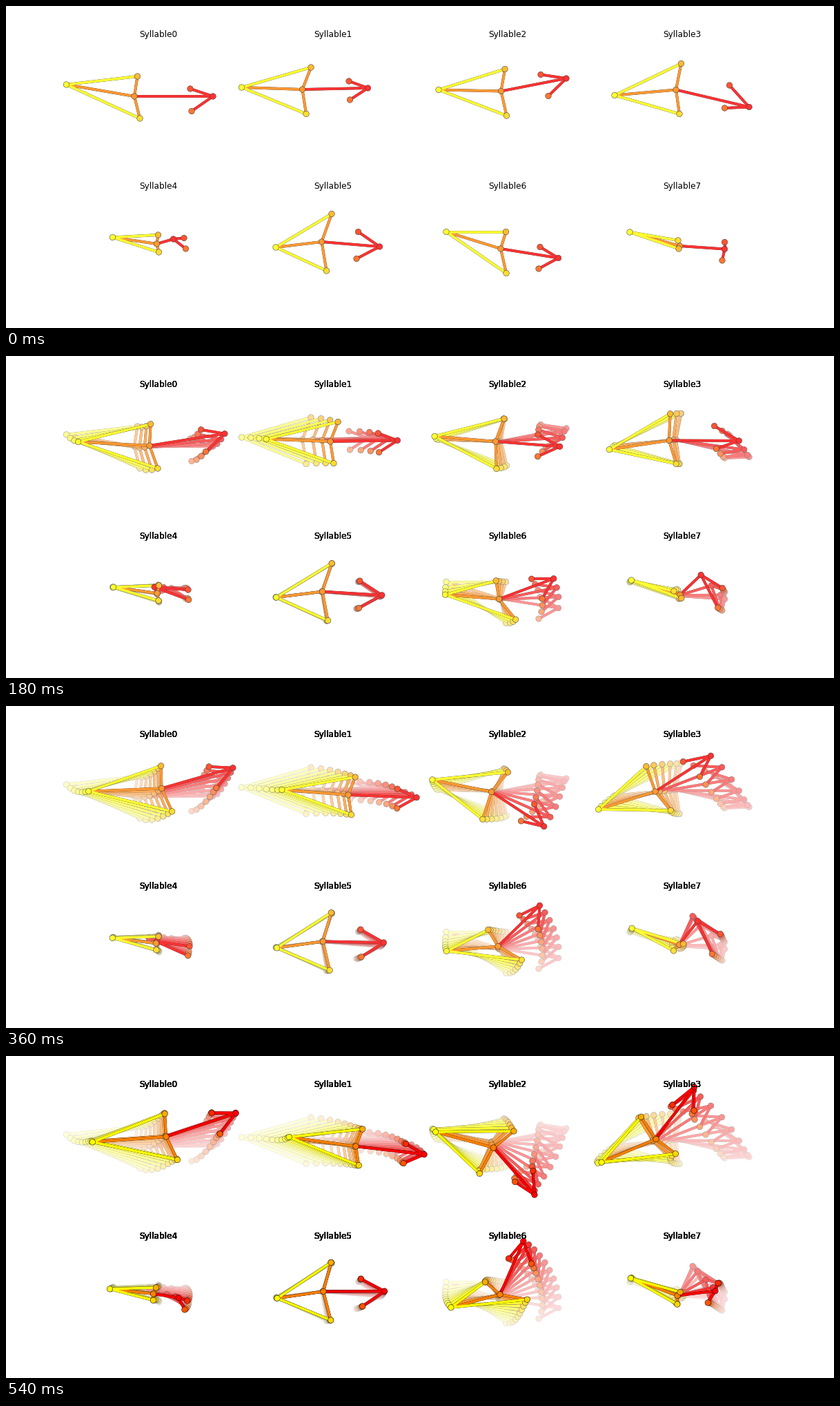
Recreate the animation shown at these times as a matplotlib script. Size 1200 px wide and 467 px high, loop 0.6 s.

```python
import numpy as np
import matplotlib.pyplot as plt
from matplotlib.animation import FuncAnimation
from matplotlib.collections import LineCollection
from matplotlib.patches import Rectangle

W, H, DPI = 1200, 467, 64
PX = 72 / DPI  # points per pixel
STEPS = 10
VEIL = 0.2
U = np.linspace(0, 1, STEPS)

# Joints: 0 nose, 1-2 ears, 3 back, 4-5 hips, 6 tail
EDGES = [(0, 3), (0, 1), (0, 2), (3, 6), (3, 4), (3, 5), (6, 4), (6, 5)]
COLORS = plt.get_cmap("autumn")(np.linspace(0, 1, 7))
EDGE_COLORS = [COLORS[a] for a, _ in EDGES]


def smooth(u):
    return u * u * (3 - 2 * u)


def linear(u):
    return u


def through(path):
    """Polynomial through points evenly spaced in time."""
    t = np.linspace(0, 1, len(path))
    return np.polyval(np.linalg.solve(np.vander(t), path), U)


def mouse(nose, ears, hips, tail, path, turns, stretch,
          ease=smooth, lag=1, nod=0):
    """Bend a resting pose, given as points x + yj, while its back moves.

    turns (degrees) and stretch are the final values for tail, hips,
    neck and head; nod pulls the nose away and back.
    """
    bend = ease(U ** lag)
    grow = np.sin(U * np.pi / 2)
    tail_m, hips_m, neck_m, head_m = (
        np.exp(1j * np.radians(a) * bend) * (1 + (s - 1) * grow)
        for a, s in zip(turns, stretch))
    back = through(path)
    head = back + (nose - path[0]) * neck_m
    joints = [head + nod * np.sin(np.pi * U) ** 2]
    joints += [head + (e - nose) * head_m for e in ears]
    joints += [back]
    joints += [back + (h - path[0]) * hips_m for h in hips]
    joints += [back + (tail - path[0]) * tail_m]
    z = np.stack(joints, axis=1)
    return np.stack([z.real, z.imag], axis=2)


MICE = [
    mouse(300 + 131j, (267 + 120j, 269 + 152.5j),
          (190.5 + 102j, 194 + 163j), 87.5 + 114j,
          path=(186 + 131j, 208 + 130j, 225.5 + 119.5j, 232 + 117j),
          turns=(-14, -12, -18.6, -18), stretch=(1.07, 1.13, 0.935, 1),
          lag=0.65),
    mouse(524.5 + 119j, (497 + 109j, 498.5 + 136j),
          (442 + 89j, 435 + 156.5j), 341.5 + 118j,
          path=(429.5 + 121j, 470 + 124j, 496 + 129j, 507 + 131j),
          turns=(6, 0, 8, 10), stretch=(1.11, 0.78, 1.05, 1.05),
          lag=2),
    mouse(812 + 105j, (775 + 99.5j, 786 + 130.5j),
          (723 + 91.5j, 725.5 + 159j), 627 + 121.5j,
          path=(717.5 + 123.5j, 709.5 + 124j, 703.5 + 124.5j, 706.5 + 133j),
          turns=(14, 41, 60, 78), stretch=(0.96, 1.17, 0.94, 0.93)),
    mouse(1077 + 146.5j, (1048.5 + 115j, 1041.5 + 148j),
          (978.5 + 83.5j, 976 + 156.5j), 882 + 129.5j,
          path=(971 + 121.5j, 961 + 122.5j, 941 + 124j, 942 + 120.5j),
          turns=(-18, -45, -67, -87), stretch=(0.96, 1, 0.86, 0.96),
          lag=1.15),
    mouse(242.5 + 338j, (258 + 336.5j, 260.5 + 352j),
          (220.5 + 332j, 221.5 + 357j), 154.5 + 335.5j,
          path=(218.5 + 345j, 218.5 + 344j, 213.5 + 345j),
          turns=(-2, 15, 25, 25), stretch=(0.98, 0.75, 1.48, 0.85),
          nod=-46 - 5j),
    mouse(541.5 + 349j, (510.5 + 327.5j, 508 + 366.5j),
          (472 + 301.5j, 464.5 + 384j), 391 + 350j,
          path=(457.5 + 342j, 459 + 341.5j, 460 + 341.5j),
          turns=(-1.5, -5, -5, -7), stretch=(1.01, 1.01, 1.05, 1.02)),
    mouse(800.5 + 365.5j, (774 + 349.5j, 772 + 381j),
          (724.5 + 327.5j, 725 + 387.5j), 638 + 327.5j,
          path=(717 + 352j, 714.5 + 352.5j, 713 + 348.5j, 716 + 346j),
          turns=(-32, -67, -75.6, -81), stretch=(0.89, 1.1, 1, 1.07),
          ease=linear, lag=0.85),
    mouse(1041.5 + 352.5j, (1041.5 + 342.5j, 1038 + 369j),
          (975 + 352j, 974 + 340j), 904 + 328j,
          path=(976.5 + 348j, 976.5 + 346j, 973 + 347.5j),
          turns=(5, -162, -11, 20), stretch=(0.96, 1.5, 0.85, 1.2),
          nod=-40 - 40j),
]

fig = plt.figure(figsize=(W / DPI, H / DPI), dpi=DPI, facecolor="white")
ax = fig.add_axes([0, 0, 1, 1])
ax.axis("off")


def draw_titles():
    return [ax.text(220.5 + 253 * (n % 4), 45 + 220 * (n // 4),
                    f"Syllable{n}", family="DejaVu Sans", size=12.1 * PX,
                    ha="center", va="baseline", zorder=4 * STEPS)
            for n in range(len(MICE))]


def draw_step(i):
    """Skeletons and titles of one step, then a veil that fades the bones."""
    z = 4 * i
    poses = [m[i] for m in MICE]
    segs = [p[list(e)] for p in poses for e in EDGES]
    artists = draw_titles()
    for color, width, order in (("black", 3.9, z),
                                (EDGE_COLORS * len(poses), 3.6, z + 1)):
        artists.append(ax.add_collection(LineCollection(
            segs, colors=color, linewidths=width * PX,
            capstyle="projecting", zorder=order), autolim=False))
    artists.append(ax.scatter(
        *np.concatenate(poses).T, s=(8.5 * PX) ** 2,
        c=np.tile(COLORS, (len(poses), 1)), edgecolors="black",
        linewidths=0.5 * PX, zorder=z + 2))
    if i < STEPS - 1:
        artists.append(ax.add_patch(Rectangle(
            (0, 0), W, H, facecolor="white", edgecolor="none",
            alpha=VEIL, zorder=z + 3)))
    return artists


layers = [draw_step(i) for i in range(STEPS)]
ax.set(xlim=(0, W), ylim=(H, 0))


def update(frame):
    for i, artists in enumerate(layers):
        for artist in artists:
            artist.set_visible(i <= frame)
    return []


anim = FuncAnimation(fig, update, frames=STEPS, interval=60,
                     repeat=True, repeat_delay=0, blit=False)
plt.show()
```
